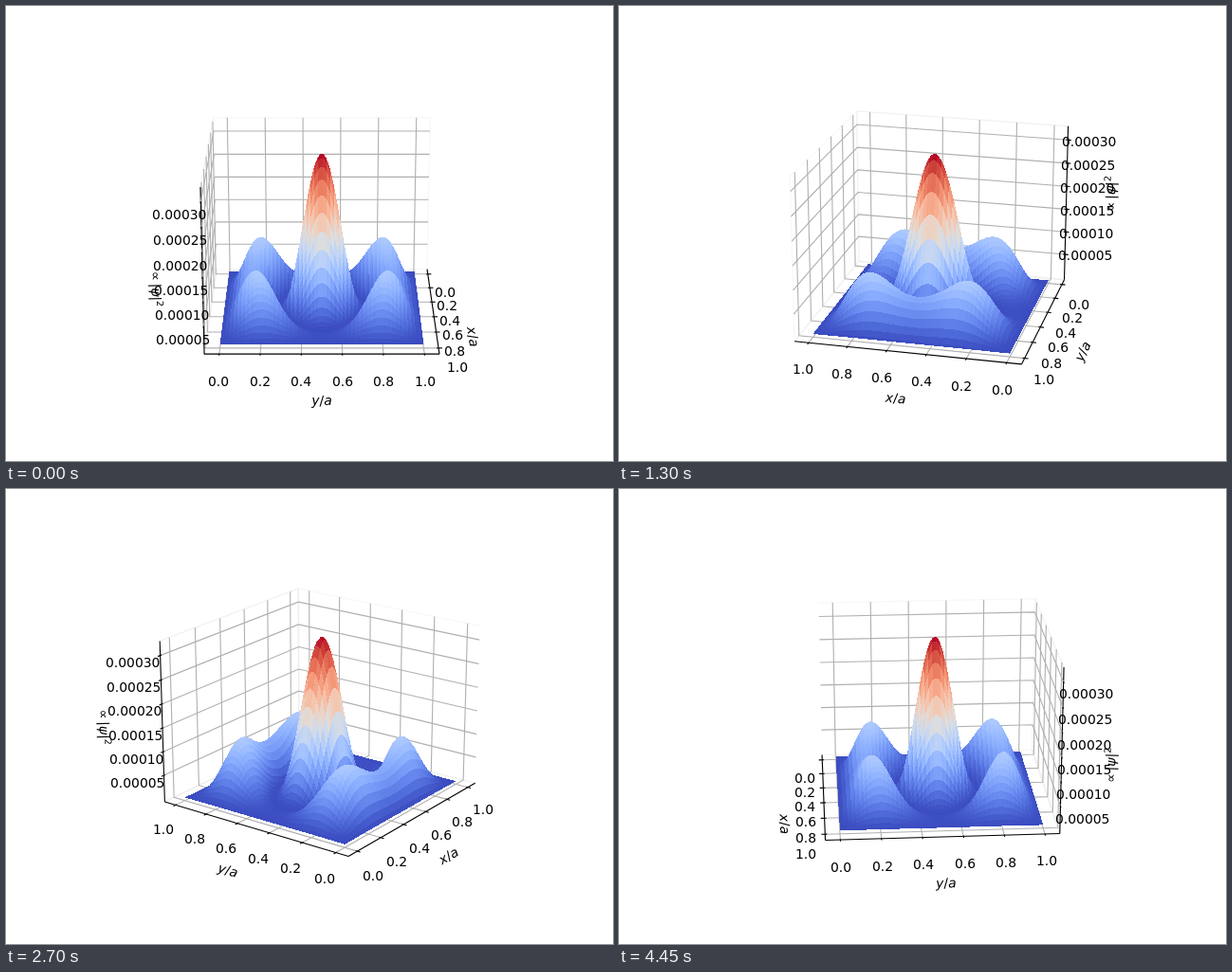
Write an HTML page with a canvas that moves like this. It is 640x480 px and loops after 4.5 s.

```html
<!DOCTYPE html>
<html lang="en">
<head>
<meta charset="utf-8">
<title>Probability density in a square box</title>
<style>
html, body { margin: 0; width: 100%; height: 100%; overflow: hidden; background: #fff; }
canvas { display: block; }
</style>
</head>
<body>
<canvas id="stage" width="640" height="480"></canvas>
<script>
const W = 640, H = 480;
const STEP_MS = 50, STEPS = 90;
const ctx = document.getElementById('stage').getContext('2d');

// Camera
const ELEV = 20 * Math.PI / 180, DIST = 10;
const SCALE = 369.6 / 0.185, CX = 333, CY = 237.4;
const sinE = Math.sin(ELEV), cosE = Math.cos(ELEV);
let sinA = 0, cosA = 1;

function project([x, y, z]) {
  const toward = x * cosA + y * sinA;
  const right = y * cosA - x * sinA;
  const depth = DIST - toward * cosE - z * sinE;
  const k = SCALE / depth;
  return [CX + right * k, CY - (z * cosE - toward * sinE) * k, depth];
}

// Box: half sizes of the data range, tick unit, outer edge
const HALF = [4 / 7, 4 / 7, 3 / 7];
const UNIT = HALF.map(h => h / 6);
const EDGE = HALF.map(h => h * 25 / 24);
const PT = 48 / (2 * 369.6 * 0.72);
const toWorld = t => (t - 0.5) / 1.1 * 2 * HALF[0];

// Density of a mix of the (1,3) and (3,1) box states
const N = 150, MIX = 0.545;
const wave = (n, i) => Math.sin(n * Math.PI * (i + 1) / (N + 1));
const density = new Float64Array(N * N);
let total = 0;
for (let i = 0; i < N; i++) {
  for (let j = 0; j < N; j++) {
    const psi = wave(1, i) * wave(3, j) + MIX * wave(3, i) * wave(1, j);
    total += density[i * N + j] = psi * psi;
  }
}
let peak = 0;
for (let k = 0; k < N * N; k++) peak = Math.max(peak, density[k] /= total);
const heightOf = v => (v / peak * 2 - 1) * HALF[2];
const points = Array.from(density, (v, k) =>
  [toWorld(Math.floor(k / N) / (N - 1)), toWorld(k % N / (N - 1)), heightOf(v)]);

// Cool-to-warm colour scale
const STOPS = [
  [59, 76, 192], [77, 104, 215], [98, 130, 234], [119, 154, 247], [141, 176, 254],
  [163, 194, 255], [184, 208, 249], [204, 217, 238], [221, 221, 221],
  [236, 211, 197], [245, 196, 173], [247, 177, 148], [244, 154, 123],
  [236, 127, 99], [222, 96, 77], [203, 62, 56], [180, 4, 38]
];
function colour(t) {
  const s = t * (STOPS.length - 1), i = Math.min(Math.floor(s), STOPS.length - 2);
  const [r, g, b] = STOPS[i].map((c, n) => Math.round(c + (STOPS[i + 1][n] - c) * (s - i)));
  return (255 << 24 | b << 16 | g << 8 | r) >>> 0;
}

// Patches: each one is the perimeter of a small block of the grid
const cuts = [];
for (let i = 0; i < N - 1; i += 3) cuts.push(i);
cuts.push(N - 1);

function perimeter(i0, i1, j0, j1) {
  const ring = [];
  for (let j = j0; j < j1; j++) ring.push(i0 * N + j);
  for (let i = i0; i < i1; i++) ring.push(i * N + j1);
  for (let j = j1; j > j0; j--) ring.push(i1 * N + j);
  for (let i = i1; i > i0; i--) ring.push(i * N + j0);
  return ring;
}
const mean = (ring, f) => ring.reduce((s, k) => s + f(k), 0) / ring.length;

const patches = [];
for (let a = 0; a < cuts.length - 1; a++) {
  for (let b = 0; b < cuts.length - 1; b++) {
    const ring = perimeter(cuts[a], cuts[a + 1], cuts[b], cuts[b + 1]);
    patches.push({ ring, value: mean(ring, k => density[k]), depth: 0, rgba: 0 });
  }
}
const values = patches.map(p => p.value);
const low = Math.min(...values), high = Math.max(...values);
for (const p of patches) p.rgba = colour((p.value - low) / (high - low));

// Surface layer, filled without antialiasing
const layer = document.createElement('canvas');
layer.width = W;
layer.height = H;
const layerCtx = layer.getContext('2d');
const image = layerCtx.createImageData(W, H);
const pixels = new Uint32Array(image.data.buffer);

function fillRing(pts, rgba) {
  let top = H, bottom = 0;
  for (const p of pts) {
    top = Math.min(top, p[1]);
    bottom = Math.max(bottom, p[1]);
  }
  for (let row = Math.ceil(top - 0.5); row + 0.5 < bottom; row++) {
    const y = row + 0.5, xs = [];
    for (let n = 0; n < pts.length; n++) {
      const p = pts[n], q = pts[(n + 1) % pts.length];
      if ((p[1] <= y) !== (q[1] <= y)) {
        xs.push(p[0] + (q[0] - p[0]) * (y - p[1]) / (q[1] - p[1]));
      }
    }
    xs.sort((u, v) => u - v);
    for (let n = 0; n + 1 < xs.length; n += 2) {
      pixels.fill(rgba, row * W + Math.ceil(xs[n] - 0.5), row * W + Math.ceil(xs[n + 1] - 0.5));
    }
  }
}

function drawSurface() {
  const flat = points.map(project);
  for (const p of patches) p.depth = mean(p.ring, k => flat[k][2]);
  patches.sort((p, q) => q.depth - p.depth);
  pixels.fill(0);
  for (const p of patches) fillRing(p.ring.map(k => flat[k]), p.rgba);
  layerCtx.putImageData(image, 0, 0);
  ctx.drawImage(layer, 0, 0);
}

// Axes
const SIZE = 10 * 100 / 72, LINE = 0.8 * 100 / 72;
const font = (style, size) => `${style} ${size}px "DejaVu Sans", sans-serif`;
const italic = text => ({ text, style: 'italic', size: SIZE, rise: 0, pad: 0 });
const plain = text => ({ ...italic(text), style: 'normal' });

const unitTicks = [0, 1, 2, 3, 4, 5].map(n => ({ at: toWorld(n / 5), text: (n / 5).toFixed(1) }));
const zTicks = [1, 2, 3, 4, 5, 6].map(n => ({ at: heightOf(n * 5e-5), text: (n * 5e-5).toFixed(5) }));

const AXES = [
  { side: 1, ticks: unitTicks, label: [italic('x'), plain('/'), italic('a')], drop: 4, grey: 0.95 },
  { side: 0, ticks: unitTicks, label: [italic('y'), plain('/'), italic('a')], drop: 4, grey: 0.9 },
  {
    side: 0, ticks: zTicks, drop: 4.5, grey: 0.925,
    label: [
      { ...plain('∝'), pad: SIZE * 0.195 }, plain('|'), italic('ψ'), plain('|'),
      { ...plain('2'), size: SIZE * 0.7, rise: 5.3 }
    ]
  }
];

function stroke(pts, style, width) {
  ctx.strokeStyle = style;
  ctx.lineWidth = width;
  ctx.beginPath();
  for (const p of pts) ctx.lineTo(...project(p));
  ctx.stroke();
}

const replace = (p, i, v) => p.map((c, n) => n === i ? v : c);
const pushOut = (p, axis, amount) =>
  p.map((c, n) => n === axis ? c : c + (c < 0 ? -1 : 1) * amount * PT * UNIT[n]);

function drawPane(axis, far) {
  const [u, v] = [[1, 2], [0, 2], [0, 1]][axis];
  const pts = [[-1, -1], [1, -1], [1, 1], [-1, 1]].map(([a, b]) =>
    replace(replace(far, u, a * EDGE[u]), v, b * EDGE[v]));
  const g = Math.round(AXES[axis].grey * 255);
  stroke(pts, `rgba(${g},${g},${g},0.5)`, 100 / 72);
}

function drawLabel(runs, x, y, angle, drop) {
  const widths = runs.map(r => {
    ctx.font = font(r.style, r.size);
    return ctx.measureText(r.text).width + 2 * r.pad;
  });
  ctx.save();
  ctx.translate(x, y);
  ctx.rotate(angle);
  let left = -widths.reduce((s, w) => s + w, 0) / 2;
  runs.forEach((r, n) => {
    ctx.font = font(r.style, r.size);
    ctx.fillText(r.text, left + r.pad, drop - r.rise);
    left += widths[n];
  });
  ctx.restore();
}

function drawAxis(index, far) {
  const { side, ticks, label, drop } = AXES[index];
  const start = replace(far, side, -far[side]);
  const end = replace(start, index, -start[index]);
  stroke([start, end], '#000', LINE);

  const p = project(start), q = project(end);
  let angle = (Math.atan2(p[1] - q[1], q[0] - p[0]) + Math.PI) % Math.PI;
  if (angle > Math.PI / 2) angle -= Math.PI;
  const [x, y] = project(pushOut(replace(start, index, 0), index, 25));
  ctx.fillStyle = '#000';
  drawLabel(label, x, y, -angle, drop);

  const a = (index + 1) % 3, b = (index + 2) % 3;
  for (const { at } of ticks) {
    const corner = replace(far, index, at);
    stroke([replace(corner, a, -far[a]), corner, replace(corner, b, -far[b])], '#b0b0b0', LINE);
  }

  const inward = Math.sign(far[side]) * UNIT[side];
  ctx.font = font('normal', SIZE);
  for (const { at, text } of ticks) {
    const pos = replace(start, index, at);
    stroke([0.1, -0.2].map(f => replace(pos, side, pos[side] + f * inward)), '#000', LINE);
    const [tx, ty] = project(pushOut(pos, index, 11.5));
    ctx.fillText(text, Math.round(tx - ctx.measureText(text).width / 2), Math.round(ty + 11));
  }
}

function draw(step) {
  const azim = step * 2 * Math.PI / STEPS;
  sinA = Math.sin(azim);
  cosA = Math.cos(azim);
  ctx.fillStyle = '#fff';
  ctx.fillRect(0, 0, W, H);
  const far = [cosA < 0 ? EDGE[0] : -EDGE[0], sinA < -1e-9 ? EDGE[1] : -EDGE[1], -EDGE[2]];
  for (let n = 0; n < 3; n++) drawPane(n, far);
  for (let n = 0; n < 3; n++) drawAxis(n, far);
  drawSurface();
}

let shown = -1;
const startTime = performance.now();
function tick() {
  const step = Math.floor((performance.now() - startTime) / STEP_MS) % STEPS;
  if (step !== shown) draw(shown = step);
  requestAnimationFrame(tick);
}
tick();
</script>
</body>
</html>
```
